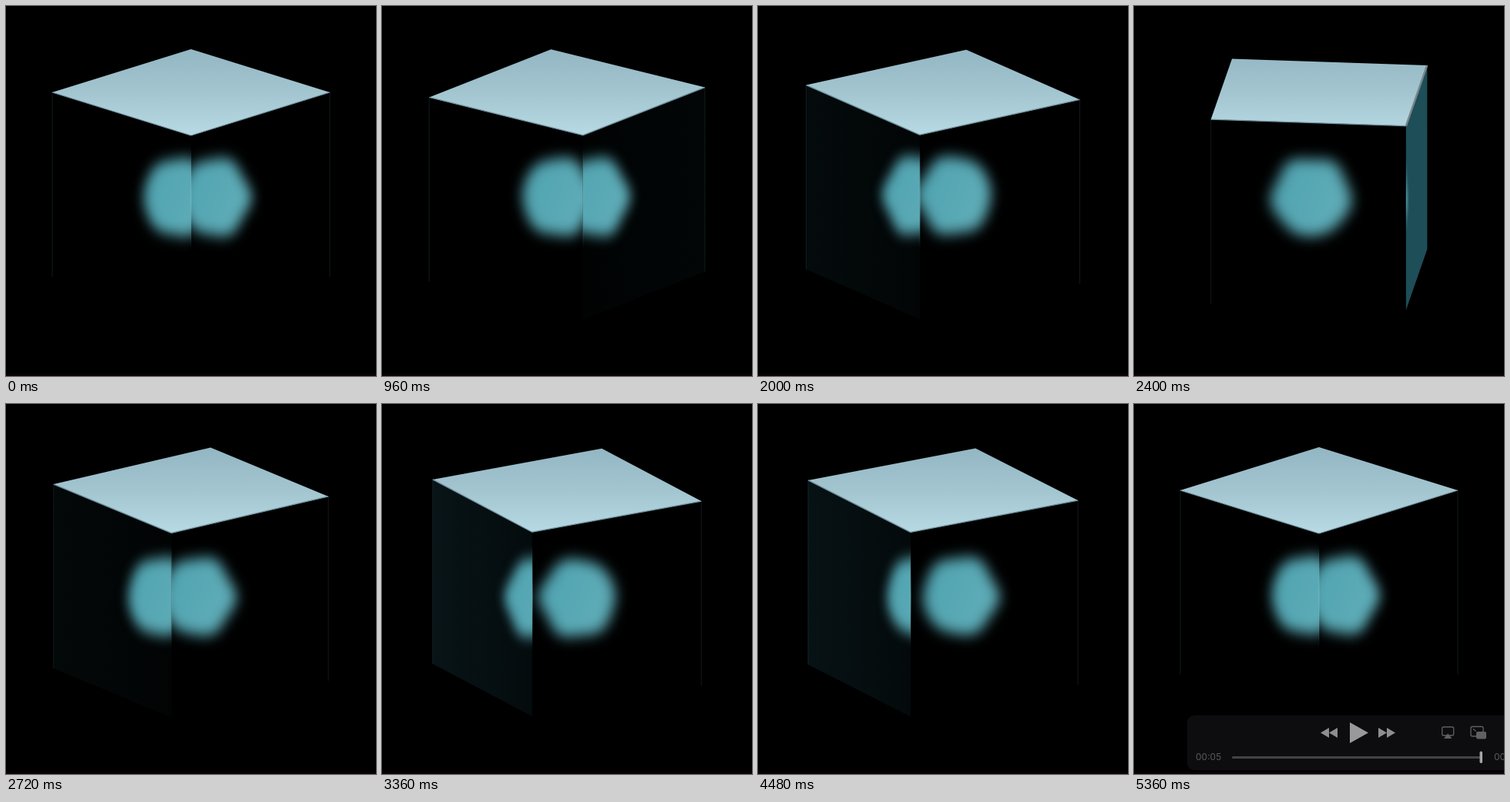
Recreate the animation shown at these times as an HTML page with a canvas. Size 480 by 480 pixels, loop 5840 ms.

```html
<!DOCTYPE html>
<html lang="en">
<head>
<meta charset="utf-8">
<title>Glass cube</title>
<style>
html, body { margin: 0; width: 100%; height: 100%; overflow: hidden; background: #000; }
canvas { display: block; }
</style>
</head>
<body>
<canvas id="stage" width="480" height="480"></canvas>
<script>
const LOOP = 5840, STEP = 40, LAST = 5360;
const SPIN_START = 520, SPIN_TIME = 4630;
const CX = 240, CY = 112, RX = 180, RY = 56, HEIGHT = 239, HALF = 127;
const INDEX = 1.2; // refraction of the glass
const ctx = document.getElementById('stage').getContext('2d');
const glow = document.createElement('canvas');
glow.width = glow.height = 180;
const glowCtx = glow.getContext('2d');

const clamp = v => Math.max(0, Math.min(1, v));
const rad = deg => deg * Math.PI / 180;
const corner = deg => [CX + RX * Math.cos(rad(deg)), CY + RY * Math.sin(rad(deg))];

// cubic-bezier(.415, 0, .553, 1)
function easeInOut(x) {
  let lo = 0, hi = 1, s = 0.5;
  for (let i = 0; i < 24; i++) {
    s = (lo + hi) / 2;
    const bx = 3 * 0.415 * s * (1 - s) ** 2 + 3 * 0.553 * s * s * (1 - s) + s ** 3;
    if (bx < x) lo = s; else hi = s;
  }
  return s * s * (3 - 2 * s);
}

function trace(c, points) {
  c.beginPath();
  points.forEach(([x, y]) => c.lineTo(x, y));
  c.closePath();
}

function line(from, to, color, width) {
  ctx.strokeStyle = color;
  ctx.lineWidth = width;
  ctx.beginPath();
  ctx.moveTo(...from);
  ctx.lineTo(...to);
  ctx.stroke();
}

function paintGlow(turn) {
  const points = [];
  for (let deg = 0; deg < 360; deg += 4) {
    const f = rad(deg);
    const r = 51 + 1.4 * Math.cos(6 * f) + 1.6 * Math.cos(5 * f + 2 * rad(turn));
    points.push([90 + r * Math.cos(f), 90 + r * Math.sin(f)]);
  }
  const shade = glowCtx.createLinearGradient(40, 70, 140, 110);
  shade.addColorStop(0, '#50a4b1');
  shade.addColorStop(1, '#60adb8');
  glowCtx.clearRect(0, 0, 180, 180);
  glowCtx.filter = 'blur(9px)';
  glowCtx.fillStyle = shade;
  trace(glowCtx, points);
  glowCtx.fill();
}

function drawSide(normal, turn) {
  const s = Math.cos(rad(normal)), c = Math.sin(rad(normal));
  if (c < 0.005) return;
  const right = corner(normal - 45), left = corner(normal + 45);
  const [near, far] = right[1] > left[1] ? [right, left] : [left, right];
  const tilt = Math.asin(Math.abs(s)) * 180 / Math.PI;
  const light = clamp((tilt - 45) / 36) ** 1.6;
  const tint = k => `rgb(${[30, 78, 88].map(v => Math.round(v * light * k))})`;

  ctx.save();
  trace(ctx, [right, left, [left[0], left[1] + HEIGHT], [right[0], right[1] + HEIGHT]]);
  if (light > 0) {
    const shade = ctx.createLinearGradient(near[0], 0, far[0], 0);
    shade.addColorStop(0, tint(0.5 + 0.5 * light));
    shade.addColorStop(1, tint(1.15 - 0.15 * light));
    ctx.fillStyle = shade;
    ctx.fill();
  }
  ctx.clip();
  // The glow sits off the axis, so it circles as the cube turns.
  const orbit = rad(turn + 20);
  const cosIn = Math.sqrt(1 - (s / INDEX) ** 2);
  const shift = HALF * (s - c * s / INDEX / cosIn);
  ctx.translate(CX + shift, 249 - 3 * Math.sin(orbit));
  ctx.scale(c / cosIn, 1);
  ctx.drawImage(glow, 9 * Math.cos(orbit) - 90, -90);
  ctx.restore();
}

function drawCube(turn) {
  const first = 90 - turn;
  const corners = [0, 90, 180, 270].map(d => corner(first + d));
  paintGlow(turn);
  for (let k = 0; k < 4; k++) drawSide(first + 45 + 90 * k, turn);

  const byX = [...corners].sort((a, b) => a[0] - b[0]);
  for (const [x, y] of [byX[0], byX[3]]) {
    line([x, y], [x, y + HEIGHT], 'rgba(50,75,80,.35)', 1);
  }
  const front = corners.reduce((a, b) => a[1] > b[1] ? a : b);
  const seam = ctx.createLinearGradient(0, 185, 0, 315);
  seam.addColorStop(0, 'rgba(120,190,198,0)');
  seam.addColorStop(0.5, 'rgba(120,190,198,.45)');
  seam.addColorStop(1, 'rgba(120,190,198,0)');
  if (Math.abs(front[0] - CX) < 50) line([front[0], 185], [front[0], 315], seam, 2);

  const top = ctx.createLinearGradient(0, CY - RY, 0, CY + RY);
  top.addColorStop(0, '#93b6c3');
  top.addColorStop(0.5, '#a2c5d0');
  top.addColorStop(1, '#b8dae4');
  trace(ctx, corners);
  ctx.fillStyle = top;
  ctx.fill();
  for (let k = 0; k < 4; k++) {
    const normal = first + 45 + 90 * k;
    if (Math.sin(rad(normal)) < 0) continue;
    const steep = Math.abs(Math.cos(rad(normal))) > 0.9;
    line(corner(normal - 45), corner(normal + 45), steep ? '#76858b' : '#6f919d', steep ? 2.5 : 1.3);
  }
}

function triangle(x, y, w, h) {
  trace(ctx, [[x, y - h / 2], [x + w, y], [x, y + h / 2]]);
  ctx.fill();
}

function box(x, y, w, h, r) {
  ctx.beginPath();
  ctx.roundRect(x, y, w, h, r);
}

function drawPlayer(alpha) {
  ctx.save();
  ctx.globalAlpha = alpha;
  ctx.fillStyle = '#0d0c0f';
  box(69, 404, 430, 71, 9);
  ctx.fill();

  ctx.fillStyle = '#8e8e90';
  triangle(264, 426.5, -11, 13);
  triangle(253, 426.5, -11, 13);
  triangle(317, 426.5, 11, 13);
  triangle(328, 426.5, 11, 13);
  ctx.fillStyle = '#99999b';
  triangle(280, 426.5, 24, 27);

  ctx.strokeStyle = ctx.fillStyle = '#606063';
  ctx.lineWidth = 1.3;
  box(399.7, 419, 15, 11, 2);
  ctx.stroke();
  trace(ctx, [[402, 434], [407.2, 427.5], [412.4, 434]]);
  ctx.fill();
  box(437, 418.5, 16, 12.5, 2);
  ctx.stroke();
  box(444, 425, 13, 9.5, 2);
  ctx.fill();
  line([440, 421.5], [443.5, 424.5], '#606063', 1.3);

  ctx.fillStyle = '#5b5b5e';
  ctx.font = '12px Inter, sans-serif';
  ctx.fillText('00:05', 80, 462);
  ctx.fillText('00:05', 467, 462);
  ctx.fillStyle = '#434346';
  box(127, 457, 323, 3, 1.5);
  ctx.fill();
  ctx.fillStyle = '#a5a5a7';
  box(448.5, 450.5, 3.5, 15.5, 1.7);
  ctx.fill();
  ctx.restore();
}

function draw(now) {
  const t = Math.min(LAST, Math.floor((now % LOOP) / STEP) * STEP);
  ctx.fillStyle = '#000';
  ctx.fillRect(0, 0, 480, 480);
  ctx.fillStyle = '#0a0207';
  ctx.fillRect(0, 477, 480, 3);
  drawCube(360 * easeInOut(clamp((t - SPIN_START) / SPIN_TIME)));
  const shown = clamp((t - 5200) / 160) ** 2;
  if (shown > 0) drawPlayer(shown);
}

const start = performance.now();
function tick() {
  draw(performance.now() - start);
  requestAnimationFrame(tick);
}
tick();
</script>
</body>
</html>
```
